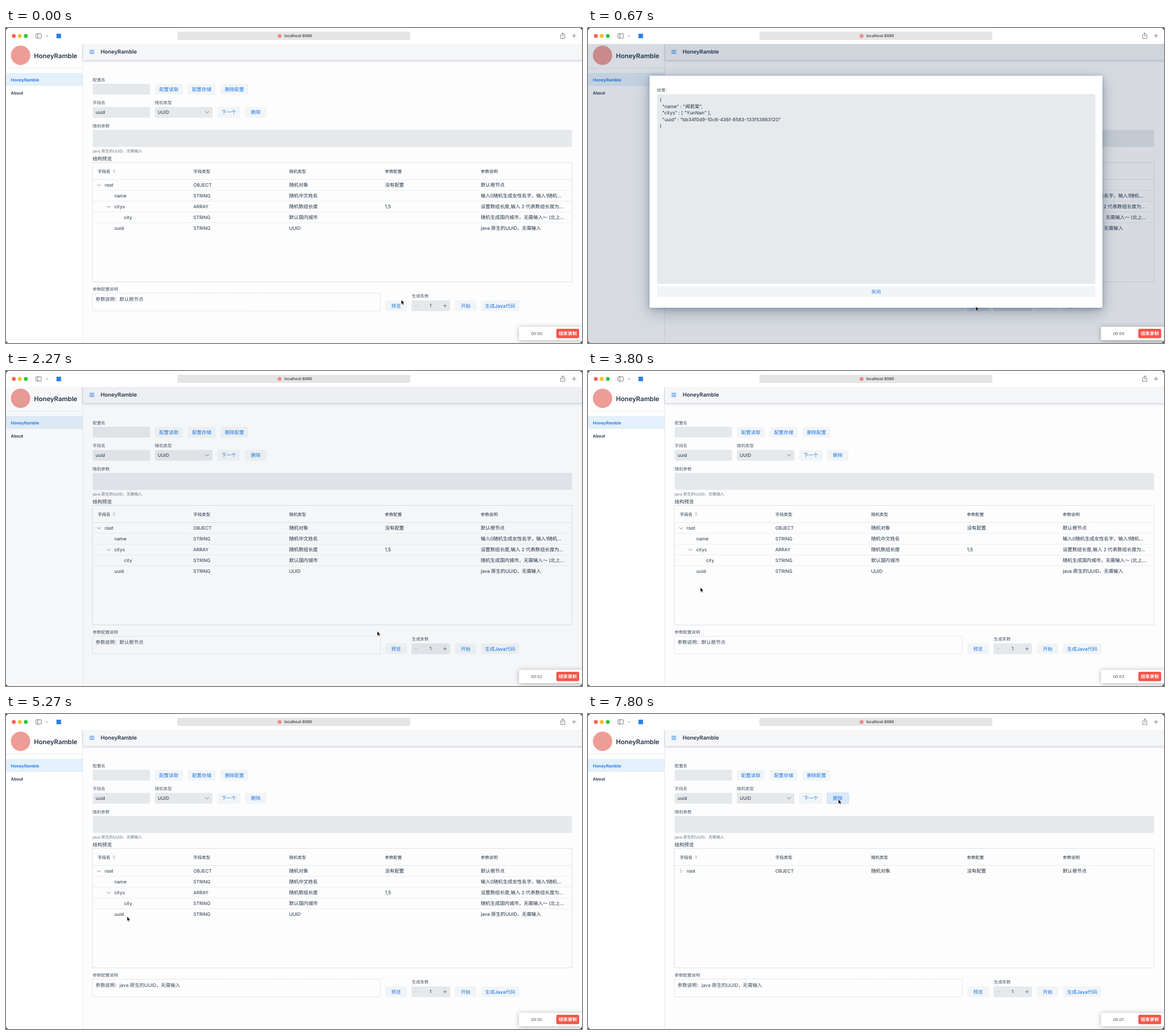
Animation, 1010 px wide and 554 px high, one loop 8 s. Source, as an HTML page:

```html
<!DOCTYPE html>
<html lang="zh-CN">
<head>
<meta charset="utf-8">
<title>HoneyRamble</title>
<style>
  html, body { margin: 0; height: 100%; overflow: hidden; background: #222; }
  svg { display: block; width: 1010px; height: 554px; }
  text { font-family: Inter, "Noto Sans CJK SC", "Noto Sans CJK", sans-serif; text-rendering: geometricPrecision; white-space: pre; }
  .line { fill: none; stroke-linecap: round; stroke-linejoin: round; }
  #dialog { filter: drop-shadow(0 2px 5px rgba(28,52,84,.26)) drop-shadow(0 8px 14px rgba(28,52,84,.3)); }
  #recorder > rect:first-child { filter: drop-shadow(0 1px 4px rgba(0,0,0,.3)); }
  #header { filter: drop-shadow(0 1px 2px rgba(28,52,84,.28)); }
  #press { filter: blur(2px); }
</style>
</head>
<body>
<svg id="stage" viewBox="0 0 1010 554"></svg>
<script>
const BLUE = '#1a76e4', INK = '#243348', LABEL = '#49566a', FIELD = '#e6e9ec', BUTTON = '#f2f5f7', HOVER = '#dce9f8';
const APP = 'HoneyRamble';
const stage = document.getElementById('stage');

// Text is placed by its left edge (or anchor) and its vertical centre.
const text = (x, cy, value, { size = 8.45, color = INK, weight = 400, anchor = 'start', gap = 0, id = '' } = {}) =>
  `<text ${id && `id="${id}"`} x="${x}" y="${cy + size * .36}" font-size="${size}" font-weight="${weight}" fill="${color}" text-anchor="${anchor}" letter-spacing="${gap}">${value}</text>`;
const rect = (x, y, w, h, fill, r = 0, extra = '') =>
  `<rect x="${x}" y="${y}" width="${w}" height="${h}" rx="${r}" fill="${fill}" ${extra}/>`;
const circle = (x, y, r, fill) => `<circle cx="${x}" cy="${y}" r="${r}" fill="${fill}"/>`;
const line = (d, color, width = 1, id = '') =>
  `<path class="line" ${id && `id="${id}"`} d="${d}" stroke="${color}" stroke-width="${width}"/>`;
const group = (id, ...parts) => `<g id="${id}">${parts.join('')}</g>`;

const label = (x, cy, value) => text(x, cy, value, { size: 7.4, weight: 500, color: LABEL });
const latin = (x, cy, value) => text(x, cy, value, { size: 8.1 });
const mixed = (x, cy, value) => text(x, cy, value, { gap: -.08 });
const button = (x, cy, w, value, id = '') =>
  rect(x, cy - 9.5, w, 19, BUTTON, 2, id && `id="${id}"`) +
  text(x + w / 2, cy, value, { weight: 500, color: BLUE, anchor: 'middle' });
const chevron = (x, y, color = '#7d8897') => line(`M${x - 3} ${y - 1.5}l3 3 3-3`, color);

const COLUMNS = [161, 328.5, 496.5, 664.5, 832.5];
const row = (cy, indent, name, type, kind, config, note) =>
  latin(indent, cy, name) + latin(COLUMNS[1], cy, type) +
  (kind === 'UUID' ? latin : mixed)(COLUMNS[2], cy, kind) + mixed(COLUMNS[3], cy, config) + mixed(COLUMNS[4], cy, note);

const toolbar = group('toolbar',
  rect(0, 0, 1010, 28, '#fff', 5),
  circle(13.7, 14, 3.4, '#fe5f57'), circle(24.2, 14, 3.4, '#febc2e'), circle(34.7, 14, 3.4, '#28c840'),
  rect(52.5, 10, 9.5, 7.8, 'none', 1.3, 'stroke="#777"'), line('M55.8 10v7.8', '#777'),
  line('M70.3 13.2l1.7 1.6 1.7-1.6', '#888', .9),
  rect(88.5, 10, 8, 8, '#2f7fe6'),
  rect(300.5, 6.5, 408.5, 14.5, '#e5e5e5', 3),
  circle(479.7, 14, 3.5, '#e88f89'),
  text(488, 14, 'localhost:8080', { size: 6.75, weight: 500, color: '#333' }),
  line('M974.3 12H972.7v6.4h7.2V12h-1.6M976.3 15.2V8.6m-2 1.9l2-2 2 2', '#777', .9),
  line('M992.8 13.8h6.6m-3.3-3.3v6.6', '#777', .9));

const sidebar = group('sidebar',
  rect(0, 28, 134, 526, '#fff'),
  circle(25.5, 48, 17, '#ee9c96'),
  text(49, 49, APP, { size: 11.3, weight: 600 }),
  line('M0 70.5h134', '#eceef0'),
  rect(0, 79, 134, 23, '#e4f0fb'),
  text(8.5, 91, APP, { size: 7.4, weight: 600, color: BLUE }),
  text(8.5, 114, 'About', { size: 7.4, weight: 600 }),
  line('M134.5 28v526', '#e6e8eb'));

const header = `<rect id="header" x="135" y="28" width="880" height="28.5" fill="#f5f6f8"/>` +
  line('M146.8 39.2h7.4m-7.4 2.8h7.4m-7.4 2.8h7.4', BLUE, 1.1) +
  text(166, 42, APP, { size: 9.45, weight: 600 });

const form = group('form',
  label(152, 91, '配置名'), rect(152, 98, 100.5, 19, FIELD, 2),
  button(261, 107.7, 49, '配置读取'), button(318.5, 107.7, 49, '配置存储'), button(376, 107.7, 49, '删除配置'),
  label(152, 131.5, '字段名'), rect(152, 138.7, 100.5, 19, FIELD, 2), latin(157, 148.2, 'uuid'),
  label(261, 131.5, '随机类型'), rect(261, 138.7, 101, 19, FIELD, 2), latin(266, 148.2, 'UUID'),
  chevron(352.5, 148.2, '#657183'),
  button(370.5, 148.2, 40.5, '下一个'), button(419, 148.2, 38, '删除', 'remove'),
  label(152, 172, '随机参数'), rect(152, 179.3, 840.5, 30, FIELD, 2),
  text(152, 217, 'java 原生的UUID，无需输入', { size: 6.9, color: '#6b7686', gap: -.04 }));

const table = group('table',
  text(152, 230, '结构预览'),
  rect(151.5, 236.5, 841, 210, 'none', 0, 'stroke="#dfe2e6"'),
  ['字段名', '字段类型', '随机类型', '参数配置', '参数说明']
    .map((title, i) => text(COLUMNS[i], 252, title, { size: 7.4, weight: 500 })).join(''),
  '<path d="M187 251l2.5-2.8 2.5 2.8zm0 1.4l2.5 2.8 2.5-2.8z" fill="#c3c9d0"/>',
  line('M152 266.5h840', '#e6e9ec'),
  row(276, 173, 'root', 'OBJECT', '随机对象', '没有配置', '默认根节点'),
  line('M160 275l3 3 3-3', '#7d8897', 1, 'rootToggle'),
  group('branches',
    [285.5, 304.5, 323.5, 342.5].map(y => line(`M152 ${y}h840`, '#eceef1')).join(''),
    row(295, 190, 'name', 'STRING', '随机中文姓名', '', '输入0随机生成女性名字，输入1随机…'),
    chevron(179.7, 314.5),
    row(314, 190, 'citys', 'ARRAY', '随机数组长度', '1,5', '设置数组长度,输入 2 代表数组长度为…'),
    row(333, 207, 'city', 'STRING', '默认国内城市', '', '随机生成国内城市，无需输入～ (北上…'),
    row(352, 190, 'uuid', 'STRING', 'UUID', '', 'java 原生的UUID，无需输入')));

const footer = group('footer',
  label(152, 459, '参数配置说明'),
  rect(151.5, 466.5, 505, 31, 'none', 1, 'stroke="#d3d7dc" stroke-dasharray="2 1.5"'),
  text(157, 476.5, '', { id: 'detail', gap: -.04, color: '#3a475a' }),
  button(665, 488.5, 38, '预览', 'preview'),
  label(711.5, 471.5, '生成条数'), rect(711, 479, 67.5, 19, FIELD, 2),
  line('M717 488.5h5', '#c3c9d0', .9), text(744.5, 488.5, '1', { size: 8.1, anchor: 'middle' }),
  line('M767 488.5h5.4m-2.7-2.7v5.4', '#657183', .9),
  button(787, 488.5, 38, '开始'), button(833, 488.5, 67, '生成Java代码'));

const result = ['{', '"name" : "闻若棠",', '"citys" : [ "YunNan" ],',
  '"uuid" : "bb34f0d9-10c6-436f-8583-133f53863120"', '}'];
const dialog = group('modal',
  `<rect id="dialog" x="108" y="84" width="794" height="408" rx="2" fill="#fff"/>`,
  label(121, 109, '结果：'),
  rect(121, 116.5, 768.5, 333.5, '#e6eaec', 2),
  result.map((value, i) => text(value.length > 1 ? 130 : 125.5, 126 + i * 11.55, value, { size: 8.35 })).join(''),
  rect(121, 454.5, 768.5, 18.5, BUTTON, 2, 'id="close"'),
  rect(295, 458, 422, 12, '#cde1f8', 2, 'id="press"'),
  text(505, 464, '关闭', { weight: 500, color: BLUE, anchor: 'middle' }));

const recorder = group('recorder',
  rect(899.5, 525.5, 112, 23.5, '#fff', 1),
  text(930.5, 537.3, '', { id: 'clock', size: 7, color: '#555', anchor: 'middle' }),
  rect(965, 529, 40, 16.5, '#f4574a', 2.5),
  text(985, 537.3, '结束录制', { size: 7.9, weight: 600, color: '#fff', anchor: 'middle' }));

stage.innerHTML =
  '<clipPath id="window"><rect width="1010" height="554" rx="5"/></clipPath><g clip-path="url(#window)">' +
  rect(0, 0, 1010, 554, '#fdfdfe') + sidebar + header + toolbar + form + table + footer +
  rect(0, 28, 1010, 526, '#1c3454', 0, 'id="shade"') + dialog + recorder + '</g>' +
  '<path id="cursor" d="M0 0V8.2L1.9 6.5 3.1 9.3 4.5 8.7 3.3 6H5.8Z" fill="#000" stroke="#fff" stroke-width=".6"/>';

const el = id => document.getElementById(id);
const set = (id, name, value) => el(id).setAttribute(name, value);
const show = (id, on) => set(id, 'visibility', on ? 'visible' : 'hidden');

// Pointer path: time, x, y
const PATH = [
  [0, 693, 478], [130, 693, 478], [530, 680, 489.5], [1130, 680, 489.5], [1670, 651, 457.5], [2530, 651, 457.5],
  [2800, 590, 440], [3270, 260, 335], [3530, 205, 314], [3800, 197, 380.5], [4000, 200, 375], [4130, 212.3, 356],
  [6130, 212.3, 356], [6530, 395, 202], [6800, 423, 157], [7130, 439, 150], [8000, 439, 150]];
const TICKS = [0, 130, 270, 400, 530, 670, 800];

function pointer(t) {
  const i = PATH.findIndex(p => p[0] > t);
  const [t0, x0, y0] = PATH[i - 1], [t1, x1, y1] = PATH[i];
  const k = (t - t0) / (t1 - t0);
  return [x0 + (x1 - x0) * k, y0 + (y1 - y0) * k];
}

function draw(now) {
  const time = now % 8000, ms = time % 1000;
  const t = time - ms + TICKS.filter(tick => tick <= ms).pop();
  const between = (a, b) => t >= a && t < b;
  const deleted = t >= 7270;

  set('cursor', 'transform', `translate(${pointer(t)})`);
  el('clock').textContent = '00:0' + Math.max(0, Math.floor((t - 270) / 1000));
  el('detail').textContent = '参数说明：' + (t < 4530 ? '默认根节点' : 'java 原生的UUID，无需输入');

  show('modal', between(670, 2270));
  set('shade', 'opacity', between(670, 2270) ? .17 : between(2270, 2400) ? .035 : between(2400, 2530) ? .008 : 0);
  set('close', 'fill', between(1400, 2270) ? '#dde9f5' : BUTTON);
  show('press', between(2130, 2270));
  set('preview', 'fill', between(270, 1400) ? HOVER : BUTTON);

  set('remove', 'fill', t >= 7000 ? HOVER : BUTTON);
  set('remove', 'stroke', deleted ? '#c5dbf7' : 'none');
  show('branches', !deleted);
  set('rootToggle', 'd', deleted ? 'M161.5 273l3 3-3 3' : 'M160 275l3 3 3-3');
  requestAnimationFrame(loop);
}
let start;
function loop(now) { draw(now - (start ??= now)); }
requestAnimationFrame(loop);
</script>
</body>
</html>
```
